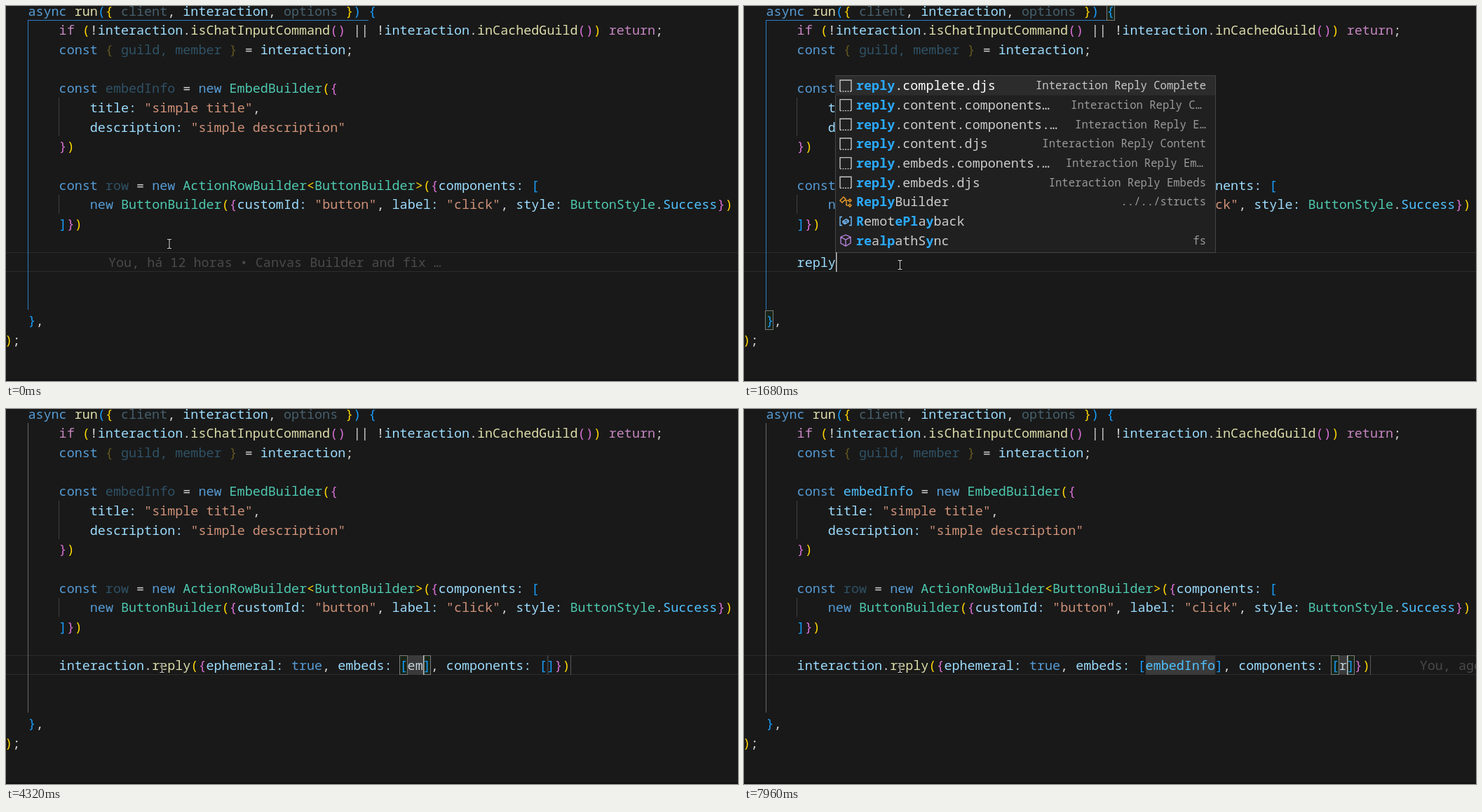
An HTML page for the animation above (8000 ms loop, 1044 by 536 pixels).

```html
<!DOCTYPE html>
<html lang="en">
<head>
<meta charset="utf-8">
<title>Editor</title>
<style>
  html, body { margin: 0; width: 100%; height: 100%; overflow: hidden; background: #191919; }
  svg { display: block; }
  text { font: 500 18.42px "Noto Sans Mono", monospace; white-space: pre; fill: #d4d4d4; }
  .k { fill: #569cd6 } .c { fill: #c586c0 } .f { fill: #dcdcaa } .t { fill: #4ec9b0 }
  .v { fill: #9cdcfe } .s { fill: #ce9178 } .o { fill: #d4d4d4 } .n { fill: #4fc1ff }
  .g1 { fill: #ffd700 } .g2 { fill: #da70d6 } .g3 { fill: #179fff }
  .p { fill: #46606d } .u { fill: #2f5266 } .d { fill: #655820 } .w { fill: #c3d3dc }
  .h { fill: #2aaaff; font-weight: 700 } .l { fill: #cccccc }
  .x { fill: #8a8a8a; text-decoration: line-through }
  .b { fill: #4a4a4a }
  .detail { font-size: 15.58px; text-anchor: end }
  .i { fill: #9a9a9a }
  .sel .l { fill: #fff } .sel .i { fill: #c8c8c8 }
  .icon { fill: none; stroke-width: 1.4 }
</style>
</head>
<body>
<svg id="stage" width="1044" height="536" viewBox="0 0 1044 536">
  <g id="page"></g>
  <g id="mouse" fill="none">
    <path d="M-3-6.5h2l1 1 1-1h2M0-5.5v11M-3 6.5h2l1-1 1 1h2" stroke="#000" stroke-width="2.4"/>
    <path d="M-3-6.5h2l1 1 1-1h2M0-5.5v11M-3 6.5h2l1-1 1 1h2" stroke="#d8d8d8" stroke-width="1.1"/>
  </g>
</svg>
<script>
const LOOP = 8000, TICK = 40;
const CW = 11.05, LH = 27.65, LEFT = 75.6, ROW = 13;
const page = document.getElementById('page');
const mouse = document.getElementById('mouse');

const colX = col => LEFT + col * CW;
const rowY = row => -6.8 + row * LH;

// A backtick and one letter switch the colour of the text that follows.
const spans = s => s.split('`').slice(1).map(p =>
  `<tspan class="${'123'.includes(p[0]) ? 'g' + p[0] : p[0]}">${p.slice(1).replace(/</g, '&lt;')}</tspan>`).join('');
const plain = s => s.replace(/`./g, '');
const text = (x, y, s, cls = '') => `<text x="${x}" y="${y}" class="${cls}">${spans(s)}</text>`;
const line = (row, col, s) => text(colX(col), rowY(row) + 20.5, s);
const rect = (x, y, w, h, fill, more = '') =>
  `<rect x="${x}" y="${y}" width="${w}" height="${h}" fill="${fill}" ${more}/>`;
const bracketBox = (col, row) =>
  rect(Math.round(colX(col)) - .5, Math.floor(rowY(row)) + .5, 11, 27, '#182418', 'stroke="#7c7c7c"');

const codeLines = info => [
  [0, -4, '`kasync `frun`3(`1{ `pclient`o, `vinteraction`o, `poptions `1}`3) {'],
  [1, 0, '`cif `1(`o!`vinteraction`o.`fisChatInputCommand`2() `o|| !`vinteraction`o.`finCachedGuild`2()`1) `creturn`o;'],
  [2, 0, '`kconst `d{ `uguild, member `d} `o= `vinteraction`o;'],
  [4, 0, '`kconst `' + info + 'embedInfo `o= `knew `tEmbedBuilder`1(`2{'],
  [5, 4, '`vtitle: `s"simple title"`o,'],
  [6, 4, '`vdescription: `s"simple description"'],
  [7, 0, '`2}`1)'],
  [9, 0, '`kconst `urow `o= `knew `tActionRowBuilder`1<`tButtonBuilder`1>(`2{`vcomponents: `3['],
  [10, 4, '`knew `tButtonBuilder`1(`2{`vcustomId: `s"button"`o, `vlabel: `s"click"`o, `vstyle: `tButtonStyle`o.`nSuccess`2}`1)'],
  [11, 0, '`3]`2}`1)'],
  [16, -4, '`3}`o,'],
  [17, -7, '`1)`o;']
];

const stroke = (color, d) => `<path class="icon" stroke="${color}" d="${d}"/>`;
const ICONS = {
  snippet: stroke('#c5c5c5', 'M-8 8V-8H8V8') +
    '<path class="icon" stroke="#c5c5c5" stroke-dasharray="2 1.5" d="M-8 8H8"/>',
  type: stroke('#ee9d28', 'M-8-2L-3-7L0-4L-5 1ZM-2-2H4M1-2V5H4M4-2L6-4L8-2L6 0ZM4 5L6 3L8 5L6 7Z'),
  value: stroke('#75beff', 'M-5-6H-8V6H-5M5-6H8V6H5M-4 0L1-3L4-1V1L-1 4L-4 2ZM-4 0L-1 1L4-1M-1 1V4'),
  method: stroke('#b180d7', 'M0-8L7-5V4L0 8L-7 4V-5ZM-7-5L0-1L7-5M0-1V8'),
  field: stroke('#75beff', 'M2-6L8-3V2L-2 6L-8 3V-2ZM-8-2L-2 1L8-3M-2 1V6'),
  kinds: stroke('#ee9d28', 'M-2-7H8V1H3M-2-7V-3M1-4H6M1-1H6M-8-2H2V6H-8ZM-6 1H0M-6 3H0')
};

// kind, label, detail, gap right of the detail
const REPLIES = [
  ['snippet', '`hreply`l.complete.djs', 'Interaction Reply Complete'],
  ['snippet', '`hreply`l.content.components…', 'Interaction Reply C…', 6],
  ['snippet', '`hreply`l.content.components.…', 'Interaction Reply E…'],
  ['snippet', '`hreply`l.content.djs', 'Interaction Reply Content'],
  ['snippet', '`hreply`l.embeds.components.…', 'Interaction Reply Em…', 4],
  ['snippet', '`hreply`l.embeds.djs', 'Interaction Reply Embeds'],
  ['type', '`hReply`lBuilder', '../../structs'],
  ['value', '`hR`lemot`hePl`la`hy`lback', ''],
  ['method', '`hre`la`hlp`lathS`hy`lnc', 'fs']
];
const EMBEDS = [
  ['value', '`hem`lbedInfo', ''],
  ['field', '`hem`lbed', '../static/core'],
  ['value', '`hem`lbedLength', 'dist/index'],
  ['value', '`hEm`lbedBuilder', ''],
  ['type', '`hEm`lbed', 'dist/index'],
  ['value', '`hEm`lbedAssertions', 'dist/index'],
  ['type', '`hEm`lbedMenu', '../../structs'],
  ['type', '`hEm`lbedMenuBuilder', '../../structs'],
  ['type', '`hEm`loji', 'dist/index'],
  ['kinds', '`xEmbedType', 'dist/index'],
  ['method', '`he`lscape`hM`larkdown', 'dist/index']
];
const POPUPS = {
  early: { x: 119, y: 62, h: 290, items: REPLIES.concat([['method', '`hrepl`lace', ''], ['method', '`hrepl`laceAll', '']]) },
  reply: { x: 130, y: 99, h: 253, items: REPLIES },
  embed: { x: 595, y: 62, h: 290, items: EMBEDS }
};

function popup({ x, y, h, items }, sel) {
  const w = 542;
  const rows = items.map(([kind, label, detail, gap = 0], i) => {
    const top = 1 + i * LH, on = i === sel;
    return `<g class="${on ? 'sel' : ''}">` + (on ? rect(0, top, w, LH, '#2c2c2c') : '') +
      `<g transform="translate(15 ${top + 14})">${ICONS[kind]}</g>` +
      text(30, top + 20.3, label) + text(w - 13 - gap, top + 19.3, '`i' + detail, 'detail') + '</g>';
  }).join('');
  return rect(x + .5, y + .5, w, h, '#202020', 'stroke="#454545"') +
    `<svg x="${x}" y="${y}" width="${w}" height="${h}">${rows}</svg>`;
}

function squiggle(col, n) {
  let d = `M${colX(col)} 379`;
  for (let i = 0; i < n * CW / 3 - 1; i++) d += `l3 ${i % 2 ? 3 : -3}`;
  return `<path d="${d}" fill="none" stroke="#f14c4c" stroke-width="1.2"/>`;
}

// Each step changes part of the state; typed is null once the snippet is in.
const STEPS = [
  [0, { typed: '', blame: 'You, há 12 horas • Canvas Builder and fix …', guide: true, info: 'u', arg: 'w', e: '', c: '' }],
  [560, { outer: true, caret: true }],
  [1000, { typed: 'r' }],
  [1160, { typed: 're', blame: '' }],
  [1240, { typed: 'rep' }],
  [1560, { typed: 'repl', pop: 'early', sel: 0 }],
  [1680, { typed: 'reply', pop: 'reply' }],
  [2080, { sel: 1 }],
  [2160, { wave: [0, 5] }],
  [2200, { caret: false }],
  [2400, { sel: 2 }],
  [2560, { sel: 3 }],
  [2640, { caret: true }],
  [2800, { sel: 4 }],
  [3120, { typed: null, pop: null, wave: null, outer: false, guide: false, stop: 1, blame: 'You, agora • Uncommitted changes' }],
  [3200, { blame: '' }],
  [3280, { match: 1 }],
  [3680, { caret: false }],
  [4200, { e: 'e', caret: true }],
  [4280, { e: 'em' }],
  [4520, { pop: 'embed', sel: -1 }],
  [4760, { wave: [45, 2] }],
  [4840, { caret: false }],
  [5000, { bulb: true }],
  [5360, { caret: true }],
  [5840, { sel: 0 }],
  [5880, { caret: false }],
  [6240, { e: 'embedInfo', pop: null, caret: true, blame: 'You, agora • Uncommitted changes' }],
  [6280, { arg: 'n' }],
  [6320, { wave: null }],
  [6560, { bulb: false }],
  [6600, { info: 'n' }],
  [6720, { caret: false }],
  [7120, { stop: 2, caret: true }],
  [7200, { match: 2 }],
  [7680, { caret: false }],
  [7840, { c: 'r', caret: true }]
];

function render(s) {
  const top = Math.floor(rowY(ROW));
  const snippet = s.typed === null;
  const eCol = 45, cCol = eCol + s.e.length + 16;
  const src = snippet
    ? '`vinteraction`o.`freply`1(`2{`vephemeral: `ktrue`o, `vembeds: `3[`' + s.arg + s.e +
      '`3]`o, `vcomponents: `3[`w' + s.c + '`3]`2}`1)'
    : '`v' + s.typed;
  const end = plain(src).length;
  const caretCol = !snippet ? end : s.stop === 1 ? eCol + s.e.length : cCol + s.c.length;
  const tabstop = (col, str) => rect(colX(col), top, Math.max(2, str.length * CW), 28, '#3a3a3a');
  const pair = (col, str) => bracketBox(col - 1, ROW) + bracketBox(col + str.length, ROW);

  let out = rect(0, 0, 1044, 536, '#191919') + rect(0, 534, 1044, 2, '#120f13');
  out += rect(0, top, 1044, 1, '#2b2b2b') + rect(0, top + 27, 1044, 1, '#2b2b2b');
  out += rect(31, 20, 1, 414, s.guide ? '#2a7fc8' : '#686868');
  if (s.guide) out += rect(31, 20, 486, 1, '#2a7fc8');
  out += rect(75, 131, 1, 55, '#404040') + rect(75, 270, 1, 27, '#404040');
  if (s.outer) out += bracketBox(40, 0) + bracketBox(-4, 16);
  if (s.match) out += s.match === 1 ? pair(eCol, s.e) : pair(cCol, s.c);
  if (snippet) out += tabstop(eCol, s.e) + tabstop(cCol, s.c) + rect(Math.round(colX(end)), top, 1, 28, '#585858');
  out += codeLines(s.info).map(l => line(...l)).join('') + line(ROW, 0, src);
  if (s.blame) out += text(colX(end) + 70.4, rowY(ROW) + 20.5, '`b' + s.blame);
  if (s.wave) out += squiggle(...s.wave);
  if (s.bulb) out += '<path d="M-10 359a7 7 0 0 1 14 0q0 3-3 5v3h-8z" fill="#ffcc00"/>' + rect(-3, 356, 4, 6, '#191919');
  if (s.pop) out += popup(POPUPS[s.pop], s.sel);
  if (s.caret) out += rect(Math.round(colX(caretCol)), top, 1.5, 28, '#c0c1c0');
  page.innerHTML = out;
}

let shown = -1;
const start = performance.now();

function frame() {
  const now = (performance.now() - start) % LOOP;
  const t = Math.floor(now / TICK) * TICK;
  const past = STEPS.filter(([at]) => at <= t);
  if (past.length !== shown) {
    shown = past.length;
    render(Object.assign({}, ...past.map(p => p[1])));
  }
  const m = Math.min(t / 480, 1), ease = m * m * (3 - 2 * m);
  mouse.setAttribute('transform', `translate(${233 - 10.5 * ease} ${340 + 30 * ease})`);
  requestAnimationFrame(frame);
}
frame();
</script>
</body>
</html>
```
